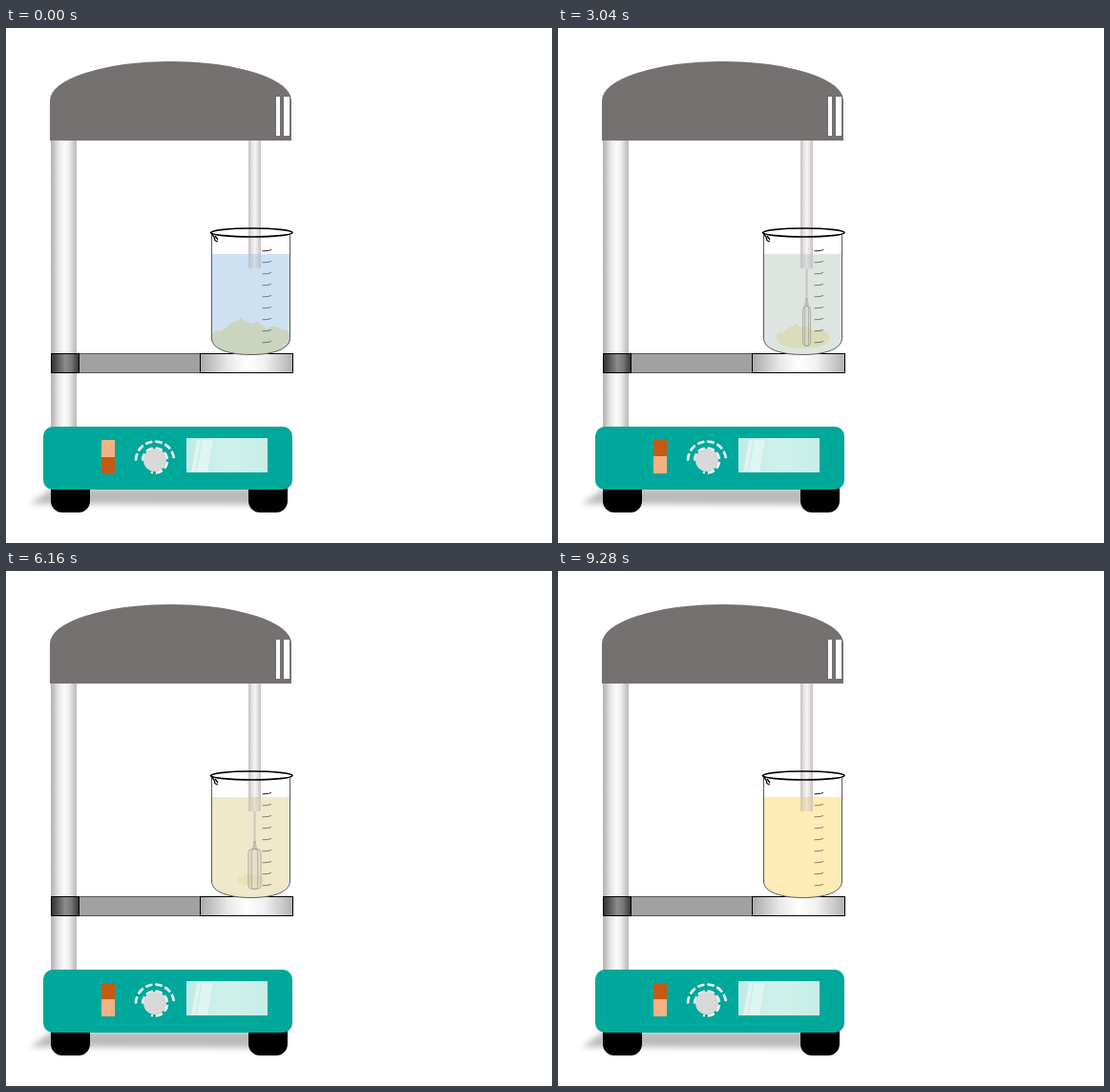
An HTML page with a canvas that plays this animation: 572x540 px, repeating every 9320 ms.

```html
<!DOCTYPE html>
<html lang="en">
<head>
<meta charset="utf-8">
<title>Overhead stirrer</title>
<style>
html, body { margin: 0; width: 100%; height: 100%; overflow: hidden; background: #fff; }
canvas { display: block; }
</style>
</head>
<body>
<canvas id="stage" width="572" height="540"></canvas>
<script>
const ctx = document.getElementById('stage').getContext('2d');
const LOOP = 9320, STEP = 40, TURN = 960;

const mix = (a, b, k) => `rgb(${a.map((v, i) => Math.round(v + (b[i] - v) * k)).join(',')})`;

function shade(x, w, stops) {
  const g = ctx.createLinearGradient(x, 0, x + w, 0);
  stops.forEach(([at, color]) => g.addColorStop(at, color));
  return g;
}

function box(x, y, w, h, fill, stroke) {
  ctx.fillStyle = fill;
  ctx.fillRect(x, y, w, h);
  if (!stroke) return;
  ctx.strokeStyle = stroke;
  ctx.lineWidth = 1;
  ctx.strokeRect(x + 0.5, y + 0.5, w - 1, h - 1);
}

function round(x, y, w, h, r, fill) {
  ctx.beginPath();
  ctx.roundRect(x, y, w, h, r);
  ctx.fillStyle = fill;
  ctx.fill();
}

function polygon(points, fill) {
  ctx.beginPath();
  points.forEach(([x, y]) => ctx.lineTo(x, y));
  ctx.closePath();
  ctx.fillStyle = fill;
  ctx.fill();
}

function line(x1, y1, x2, y2) {
  ctx.beginPath();
  ctx.moveTo(x1, y1);
  ctx.lineTo(x2, y2);
  ctx.stroke();
}

function drawStand() {
  ctx.save();
  ctx.filter = 'blur(3px)';
  polygon([[25, 499], [50, 482], [292, 482], [284, 500]], 'rgba(0,0,0,.27)');
  ctx.restore();

  box(47, 117, 27, 302, shade(47, 27, [[0, '#b2b0b1'], [0.3, '#e6e6e6'], [0.52, '#fbfbfb'], [0.7, '#eee'], [1, '#b8b6b6']]));
  box(254, 117, 13, 120, shade(254, 13, [[0, '#c4bfc0'], [0.3, '#e9e4e4'], [0.55, '#f7f4f4'], [1, '#c8c2c3']]));

  ctx.beginPath();
  ctx.moveTo(46, 118);
  ctx.lineTo(46, 76);
  ctx.ellipse(172.5, 76, 126.5, 41, 0, Math.PI, 2 * Math.PI);
  ctx.lineTo(299, 118);
  ctx.fillStyle = '#767171';
  ctx.fill();
  box(283, 72, 4, 41, '#fff');
  box(291, 72, 6, 41, '#fff');

  box(76, 341, 128, 21, '#a1a1a1', '#555');
  box(47, 341, 30, 21, shade(47, 30, [[0, '#2c2c2c'], [0.5, '#8c8c8c'], [0.7, '#787878'], [1, '#303030']]), '#000');
  box(203, 341, 98, 21, shade(203, 98, [[0, '#a9a9a9'], [0.3, '#e8e8e8'], [0.5, '#fff'], [0.7, '#f0f0f0'], [1, '#b0b0b0']]), '#000');
}

function drawBase(on) {
  round(47, 468, 41, 40, 12, '#000');
  round(254, 468, 41, 40, 12, '#000');
  round(39, 418, 261, 66, 10, '#00a79b');

  box(100, 432, 14, 18, on ? '#c55a11' : '#f4b183');
  box(100, on ? 449 : 450, 14, on ? 18 : 17.5, on ? '#f4b183' : '#c55a11');

  ctx.strokeStyle = '#fff';
  ctx.lineWidth = 2.6;
  ctx.setLineDash([7.5, 3]);
  ctx.beginPath();
  ctx.arc(156, 453.5, 20, Math.PI, 2 * Math.PI);
  ctx.stroke();
  ctx.beginPath();
  ctx.arc(156, 453.5, 13, -Math.PI, Math.PI * 0.6);
  ctx.stroke();
  ctx.setLineDash([]);
  ctx.beginPath();
  ctx.arc(156, 453, 12, 0, 2 * Math.PI);
  ctx.fillStyle = '#d9d9d9';
  ctx.fill();

  box(189, 430, 85, 36, shade(189, 85, [[0, '#bfeae4'], [0.5, '#d0f1eb'], [1, '#c6eee7']]));
  polygon([[200, 432], [217, 432], [211, 466], [194, 466]], '#e0f5f2');
  polygon([[204, 432], [206, 432], [200, 466], [198, 466]], '#cdeeea');
}

// Beaker interior from the given level down to the rounded bottom
function vesselPath(top) {
  ctx.beginPath();
  ctx.moveTo(215.5, top);
  ctx.lineTo(215.5, 325);
  ctx.bezierCurveTo(215.5, 337, 234, 342.5, 256.5, 342.5);
  ctx.bezierCurveTo(279, 342.5, 297.5, 337, 297.5, 325);
  ctx.lineTo(297.5, top);
}

const heap = [
  [215, 322], [219, 317], [224, 318], [230, 315], [236, 309], [242, 308],
  [246, 303], [251, 308], [257, 310], [263, 308], [269, 312], [273, 316],
  [278, 313], [283, 313], [289, 316], [294, 317], [298, 321], [298, 328]
];

function drawHeap(k) {
  const size = 1 - k;
  ctx.save();
  ctx.translate(256.5, 323);
  ctx.scale(size, size);
  ctx.translate(-256.5, -323);
  ctx.beginPath();
  heap.forEach(([x, y]) => ctx.lineTo(x, y));
  ctx.bezierCurveTo(295, 337, 279, 342.5, 256.5, 342.5);
  ctx.bezierCurveTo(234, 342.5, 217, 337, 215, 326);
  ctx.closePath();
  ctx.fillStyle = mix([203, 212, 190], [250, 232, 178], k);
  ctx.fill();
  ctx.restore();
}

function drawWhisk(t, k) {
  const spin = Math.abs(Math.sin(Math.PI * (t / TURN - 0.22)));
  const w = 6 + 12.5 * spin, x = 260.5 - w / 2;
  ctx.save();
  ctx.globalAlpha = 0.75 * Math.min(1, 2 * Math.min(k, 1 - k));
  ctx.strokeStyle = '#85847d';
  ctx.lineWidth = 1;
  box(259.5, 252, 2, 34, '#aaa9a2');
  polygon([[259.5, 283], [261.5, 283], [263, 291], [258, 291]], '#9b9a93');
  ctx.beginPath();
  ctx.roundRect(x, 291.5, w, 42, Math.min(4, w / 2));
  ctx.fillStyle = 'rgba(165,164,155,.3)';
  ctx.fill();
  ctx.stroke();
  ctx.beginPath();
  ctx.roundRect(260.5 - w * 0.24, 291.5, w * 0.48, 42, Math.min(3, w * 0.24));
  ctx.fillStyle = 'rgba(235,235,228,.5)';
  ctx.fill();
  ctx.stroke();
  ctx.restore();
}

function drawBeaker(t, k) {
  vesselPath(237);
  ctx.fillStyle = mix([206, 225, 243], [255, 235, 182], k);
  ctx.fill();
  drawHeap(k);

  ctx.globalAlpha = 0.35;
  box(254, 237, 13, 15, shade(254, 13, [[0, '#8f8c90'], [0.5, '#d5d2d4'], [1, '#8f8c90']]));
  ctx.globalAlpha = 1;
  drawWhisk(t, k);

  ctx.lineWidth = 1;
  for (let i = 0; i < 9; i++) {
    const y = 233.5 + 12 * i;
    ctx.strokeStyle = i ? 'rgba(40,40,40,.55)' : '#222';
    ctx.beginPath();
    ctx.moveTo(268.5, y + 0.3);
    ctx.quadraticCurveTo(275, y + 0.5, 278, y - 1);
    ctx.stroke();
  }

  vesselPath(217);
  ctx.strokeStyle = '#5a5a5a';
  ctx.stroke();

  ctx.strokeStyle = '#000';
  ctx.lineWidth = 1.7;
  ctx.beginPath();
  ctx.ellipse(257.5, 214.5, 42.5, 4.5, 0, 0, 2 * Math.PI);
  ctx.stroke();
  ctx.lineWidth = 1.3;
  line(214, 214, 218, 219);
  line(218, 219, 219, 223);
  line(219, 223, 222, 224);
  line(219, 218, 222, 222);
}

function draw(now) {
  const t = Math.floor((now % LOOP) / STEP) * STEP;
  const k = t / (LOOP - STEP);
  ctx.fillStyle = '#fff';
  ctx.fillRect(0, 0, 572, 540);
  drawStand();
  drawBase(t >= STEP);
  drawBeaker(t, k);
}

const start = performance.now();
function tick() {
  draw(performance.now() - start);
  requestAnimationFrame(tick);
}
tick();
</script>
</body>
</html>
```
